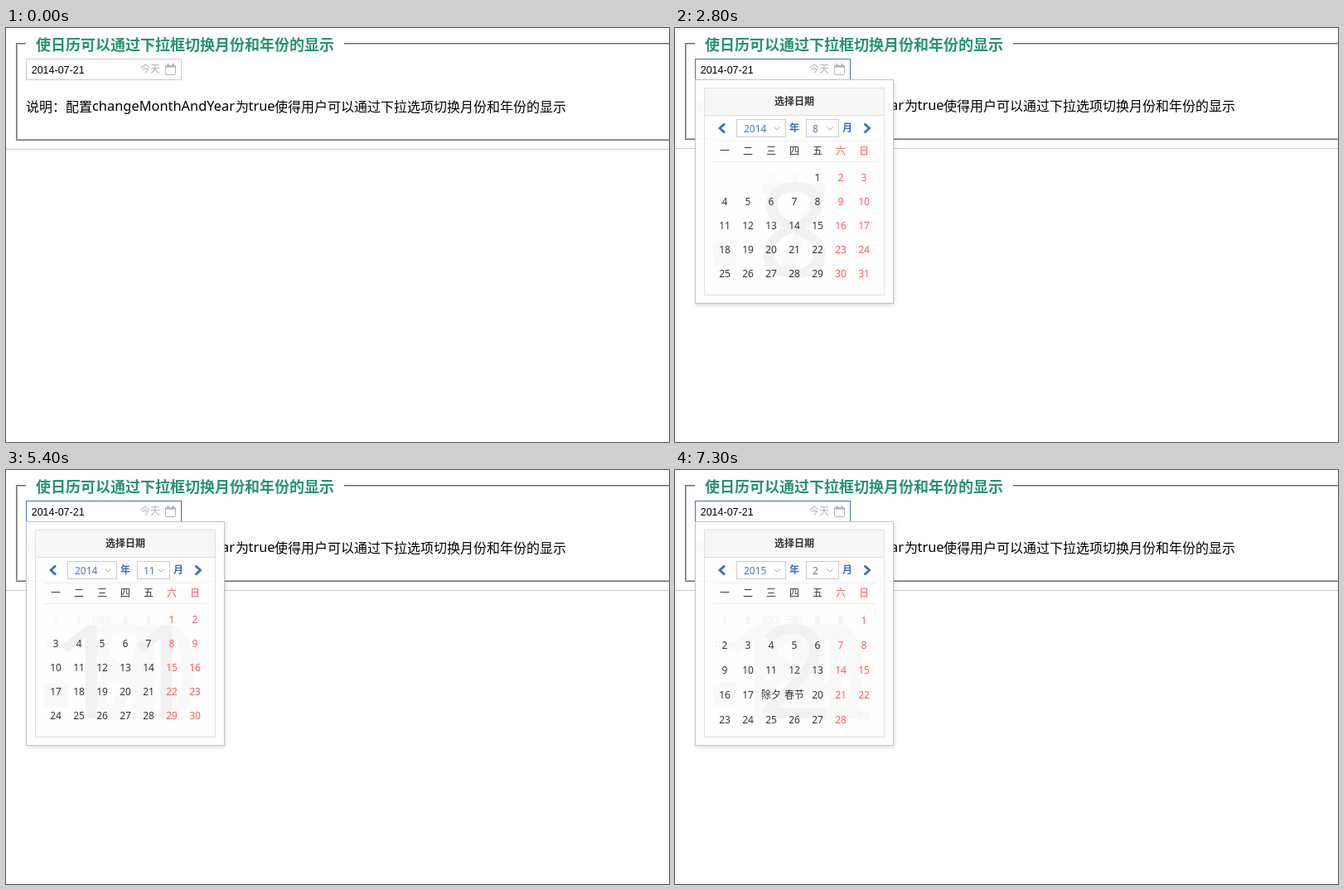
An HTML page for the animation above (8000 ms loop, 800 by 500 pixels).

```html
<!DOCTYPE html>
<html lang="zh-CN">
<head>
<meta charset="utf-8">
<title>日历</title>
<style>
html, body { margin: 0; width: 100%; height: 100%; overflow: hidden; background: #fff; }
svg { display: block; width: 800px; height: 500px; }
text { font: 12px 'Noto Sans', 'Noto Sans CJK SC', 'Noto Sans CJK', sans-serif; fill: #333; white-space: pre; }
.crisp { shape-rendering: crispEdges; }
.mid text, text.mid { text-anchor: middle; }
.legend { font-size: 18px; font-weight: bold; fill: #27936c; }
.note text { font-size: 16px; fill: #000; }
.note .latin { font-size: 16.4px; }
.value { font: 12.5px 'Liberation Sans', Arial, sans-serif; fill: #000; }
.hint { fill: #b8b3b3; }
.bold { font-weight: bold; }
.blue { fill: #3d6db5; }
.soft { fill: #4d74b3; }
text.rest { fill: #ff5a5a; }
text.on { fill: #fff; }
.big { font-size: 158px; fill: #f2f2f2; }
.trace * { mix-blend-mode: darken; }
.trace text { fill: #f3f3f3; }
.trace .big, .trace rect { fill: #f9f9f9; }
.box { fill: #fff; stroke: #ccc; }
#panel { filter: drop-shadow(1px 2px 2px rgba(0, 0, 0, .14)); }
.line { fill: none; stroke-linecap: butt; }
</style>
</head>
<body>
<svg viewBox="0 0 800 500">
  <g class="crisp">
    <path d="M12 18H24V19H13V134H12ZM408 18H800V19H408Z" fill="#6e6e6e"/>
    <path d="M13 19H24V20H14V134H13ZM408 19H800V20H408Z" fill="#b0b0b0"/>
  </g>
  <text class="legend" x="36" y="26.5">使日历可以通过下拉框切换月份和年份的显示</text>

  <g id="flow">
    <g class="crisp">
      <rect x="12" y="134" width="788" height="1" fill="#b0b0b0"/>
      <rect x="12" y="135" width="788" height="1" fill="#6e6e6e"/>
      <rect y="146" width="800" height="1" fill="#ccc"/>
    </g>
    <g class="note">
      <text x="24" y="100.5">说明：配置</text>
      <text class="latin" x="104" y="100">changeMonthAndYear</text>
      <text x="277" y="100.5">为</text>
      <text class="latin" x="292.5" y="100">true</text>
      <text x="324" y="100.5">使得用户可以通过下拉选项切换月份和年份的显示</text>
    </g>
  </g>

  <rect id="field" class="box crisp" x="24.5" y="37.5" width="187" height="25"/>
  <text class="value" x="30.7" y="55">2014-07-21</text>
  <rect id="caret" class="crisp" x="95" y="43" width="1" height="15" fill="#000"/>
  <text class="hint" x="162" y="54.3">今天</text>
  <g class="line" stroke="#b8b0b0">
    <rect x="192.5" y="45.5" width="12" height="11" rx="1"/>
    <path d="M192 46.5H205M195.5 43V47M201.5 43V47" stroke-width="2"/>
  </g>

  <g id="popup">
    <g id="panel">
      <rect x="24.5" y="62.5" width="239" height="270" fill="#fff" fill-opacity=".96" stroke="#c4c4c4"/>
    </g>
    <g class="crisp">
      <rect x="35.5" y="72.5" width="217" height="250" fill="none" stroke="#e1e1e1"/>
      <rect x="36" y="73" width="216" height="32" fill="#f7f7f7"/>
      <rect x="36" y="105" width="216" height="1" fill="#e1e1e1"/>
      <rect x="46" y="136" width="196" height="1" fill="#f0f0f0"/>
      <rect x="46" y="161" width="196" height="1" fill="#eaeaea"/>
      <rect id="yearBox" class="box" x="74.5" y="110.5" width="59" height="21"/>
      <rect class="box" x="158.5" y="110.5" width="39" height="21"/>
    </g>
    <text class="bold mid" x="144" y="93">选择日期</text>
    <path class="line" d="M60 115.5L54 121L60 126.5M228.5 115.5L234.5 121L228.5 126.5" stroke="#3d6db5" stroke-width="2.8"/>
    <path class="line" d="M119.5 119.5L123 123L126.5 119.5M183.5 119.5L187 123L190.5 119.5" stroke="#aaa"/>
    <text id="year" class="soft" x="83" y="126"></text>
    <text class="bold blue" x="138" y="125.3">年</text>
    <text id="month" class="soft" x="166" y="126"></text>
    <text class="bold blue" x="202" y="125.3">月</text>
    <g id="week" class="mid"></g>
    <g id="days" class="mid"></g>
  </g>
</svg>
<script>
const LOOP = 8000, OPEN = 800;
const pages = [
  { at: 800, y: 2014, m: 7, names: { 21: '今天' }, today: 21 },
  { at: 2800, y: 2014, m: 8, names: {} },
  { at: 3700, y: 2014, m: 9, names: { 8: '中秋' } },
  { at: 4400, y: 2014, m: 10, names: { 1: '国庆' } },
  { at: 5400, y: 2014, m: 11, names: {} },
  { at: 6000, y: 2014, m: 12, names: { 25: '圣诞' } },
  { at: 6600, y: 2015, m: 1, names: { 1: '元旦' } },
  { at: 7300, y: 2015, m: 2, names: { 18: '除夕', 19: '春节' } }
];
const $ = id => document.getElementById(id);
const colX = col => 60 + col * 28;
const label = (x, y, s, cls = '') => `<text x="${x}" y="${y}" class="${cls}">${s}</text>`;
const within = (t, a, b) => t >= a && t < b;
const show = (id, on) => { $(id).style.display = on ? '' : 'none'; };

function cells({ y, m, names, today }) {
  const first = (new Date(y, m - 1, 1).getDay() + 6) % 7;
  const count = new Date(y, m, 0).getDate();
  // months without a named day have slightly tighter rows
  const [top, step] = Object.keys(names).length ? [186, 30] : [185, 29];
  return Array.from({ length: count }, (_, i) => {
    const slot = first + i, col = slot % 7, day = i + 1;
    return {
      slot, x: colX(col), y: top + step * Math.floor(slot / 7),
      text: names[day] || day, named: day in names,
      cls: day === today ? 'on' : col > 4 ? 'rest' : ''
    };
  });
}

const todayBox = '<rect x="46" y="257" width="28" height="30" fill="#3775c0"/>';
const bigMonth = p => label(144, 300, p.m, 'big');
const dayText = c => label(c.x, c.y, c.text, c.cls);

// faint remains of the months already passed
function trace(past, used) {
  return past.map(p => (p.today ? todayBox : '') + bigMonth(p) +
    cells(p).filter(c => c.cls !== 'on' && (c.named || !used.has(c.slot)))
      .map(c => label(c.x, c.y, c.text)).join('')).join('');
}

function drawPage(n) {
  const p = pages[n], list = cells(p);
  const used = new Set(list.map(c => c.slot));
  $('year').textContent = p.y;
  $('month').textContent = p.m;
  $('days').innerHTML = `<g class="trace">${trace(pages.slice(0, n), used)}</g>` +
    bigMonth(p) + (p.today ? todayBox : '') + list.map(dayText).join('');
}

$('week').innerHTML = [...'一二三四五六日']
  .map((s, i) => label(colX(i), 153, s, i > 4 ? 'rest' : '')).join('');

let current = -1;
function frame() {
  const t = performance.now() % LOOP, open = t >= OPEN;
  const n = pages.filter(p => p.at <= t).length - 1;
  if (n !== current && n >= 0) drawPage(n);
  current = n;
  show('popup', open);
  show('caret', within(t, 800, 1300) || within(t, 1800, 2300));
  $('flow').setAttribute('transform', `translate(0 ${open ? -1 : 0})`);
  $('field').style.stroke = open ? '#4672a8' : '#ccc';
  $('yearBox').style.stroke = within(t, 1700, 2000) ? '#3775c0' : '#ccc';
  requestAnimationFrame(frame);
}
frame();
</script>
</body>
</html>
```
